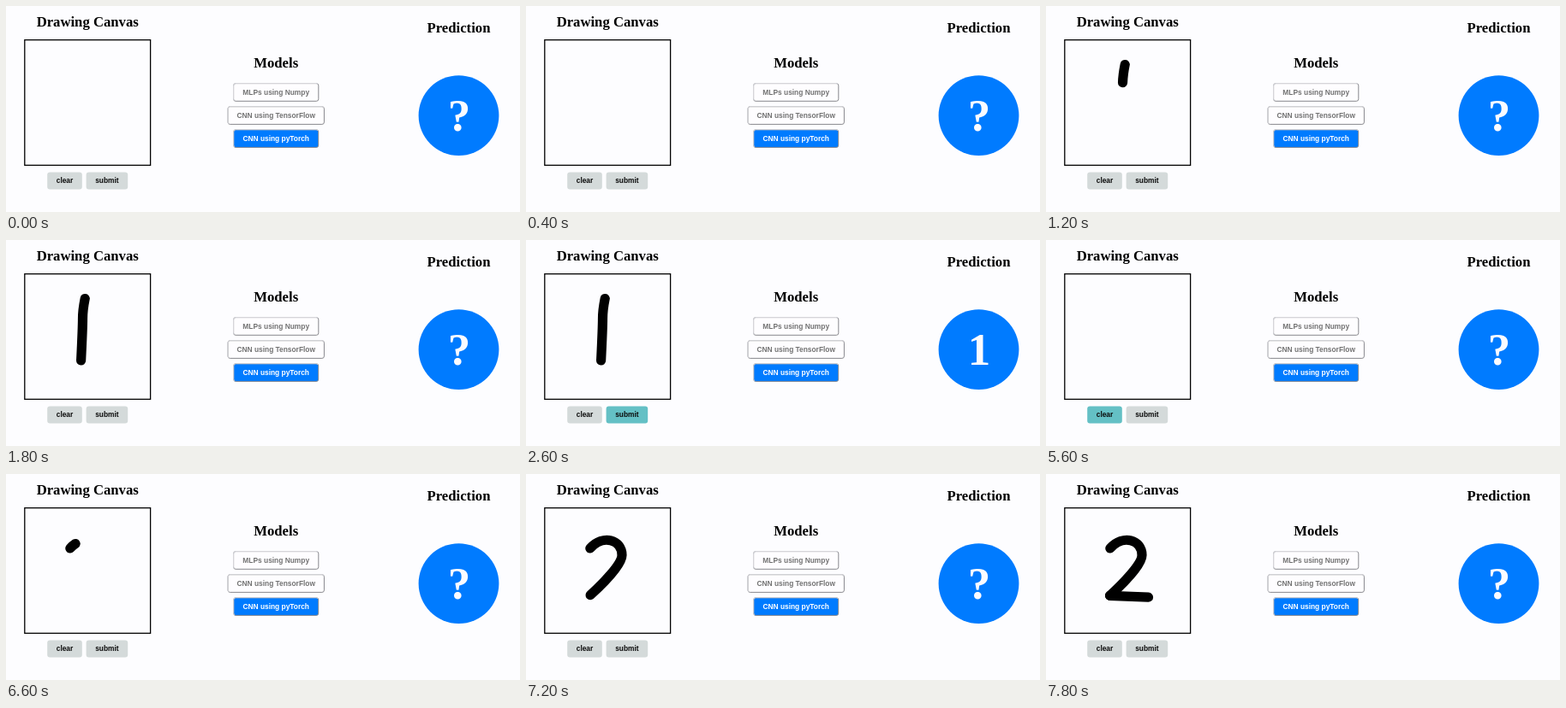
Write an HTML page with a canvas that moves like this. It is 600 px wide and 241 px high and loops after 8000 ms.

```html
<!DOCTYPE html>
<html lang="en">
<head>
<meta charset="utf-8">
<title>Digit prediction</title>
<style>
  html, body { margin: 0; width: 100%; height: 100%; overflow: hidden; background: #fdfdff; }
  canvas { display: block; width: 600px; height: 241px; }
</style>
</head>
<body>
<canvas id="stage"></canvas>
<script>
const LOOP = 8000, STEP = 200;
const SUBMITTED = 2600, CLEARED = 5600;
const BLUE = '#007bff';
const IDLE = [212, 218, 218], HOVER = [100, 192, 197];
const SERIF = '"Liberation Serif", "Times New Roman", serif';
const SANS = '"Liberation Sans", Arial, sans-serif';

const canvas = document.getElementById('stage');
const ratio = window.devicePixelRatio || 1;
canvas.width = Math.round(600 * ratio);
canvas.height = Math.round(241 * ratio);
const ctx = canvas.getContext('2d');
ctx.scale(ratio, ratio);

const clamp = v => Math.min(1, Math.max(0, v));
const smooth = p => p * p * (3 - 2 * p);
const speedUp = p => p ** 1.5;
const slowDown = p => Math.sin(p * Math.PI / 2);

function penStroke(d, start, duration, ease) {
  const shape = document.createElementNS('http://www.w3.org/2000/svg', 'path');
  shape.setAttribute('d', d);
  return { path: new Path2D(d), length: shape.getTotalLength(), start, duration, ease };
}

const ONE = [penStroke('M92.2 68.5 Q89.5 82 89.5 92 T87.6 141', 950, 700, smooth)];
const TWO = [
  penStroke('M74.8 87 C90 70 112 77 112 95 C112 106 88 130 74.5 142.3', 6470, 735, speedUp),
  penStroke('M74.5 142.3 L119.5 144.2', 7400, 400, slowDown)
];

function drawStroke({ path, length, start, duration, ease }, t) {
  const shown = length * ease(clamp((t - start) / duration));
  if (!shown) return;
  ctx.save();
  ctx.lineWidth = 11.2;
  ctx.lineCap = ctx.lineJoin = 'round';
  ctx.strokeStyle = '#000';
  ctx.setLineDash([shown, length * 2]);
  ctx.stroke(path);
  ctx.restore();
}

function label(text, x, baseline, size, family, color) {
  ctx.font = `bold ${size}px ${family}`;
  ctx.textAlign = 'center';
  ctx.fillStyle = color;
  ctx.fillText(text, x, baseline);
}

function roundBox(x, y, w, h, r) {
  ctx.beginPath();
  ctx.roundRect(x, y, w, h, r);
}

// The hover colour fades in after `enter` and is gone again at `leave`.
function actionButton(text, x, w, t, enter, leave) {
  const amount = clamp(Math.min(t - enter, leave - t) / 400);
  const mixed = IDLE.map((v, i) => v + (HOVER[i] - v) * amount);
  roundBox(x, 194.5, w, 20, 3);
  ctx.fillStyle = `rgb(${mixed.join()})`;
  ctx.fill();
  label(text, x + w / 2, 207.2, 8.4, SANS, '#0b0b0b');
}

function modelButton(text, y, w, fill, color) {
  const x = 315.2 - w / 2, h = 20.7;
  roundBox(x, y, w, h, 2.5);
  ctx.fillStyle = fill;
  ctx.fill();
  ctx.lineWidth = 1;
  ctx.strokeStyle = '#88888d';
  ctx.stroke();
  // Lighter top and left edges make the button look raised.
  ctx.save();
  ctx.beginPath();
  ctx.moveTo(x - 1, y + h + 1);
  ctx.lineTo(x - 1, y - 1);
  ctx.lineTo(x + w + 1, y - 1);
  ctx.lineTo(x + w - h / 2, y + h / 2);
  ctx.lineTo(x + h / 2, y + h / 2);
  ctx.clip();
  roundBox(x, y, w, h, 2.5);
  ctx.strokeStyle = '#dcdce0';
  ctx.stroke();
  ctx.restore();
  label(text, 315.2, y + 13.3, 8.4, SANS, color);
}

function draw(t) {
  ctx.fillStyle = '#fdfdff';
  ctx.fillRect(0, 0, 600, 241);

  label('Drawing Canvas', 95.2, 23.6, 16.7, SERIF, '#000');
  label('Models', 315.2, 72, 16.7, SERIF, '#000');
  label('Prediction', 528.5, 31, 16.7, SERIF, '#000');

  ctx.lineWidth = 1.3;
  ctx.strokeStyle = '#000';
  ctx.strokeRect(21.8, 39.7, 146.8, 146.6);
  for (const stroke of t < CLEARED ? ONE : TWO) drawStroke(stroke, t);

  actionButton('clear', 48.2, 40.6, t, CLEARED - 400, CLEARED + 400);
  actionButton('submit', 93.6, 48.6, t, 2000, 5400);

  modelButton('MLPs using Numpy', 90.6, 99.2, '#fefdff', '#727272');
  modelButton('CNN using TensorFlow', 117.7, 112.4, '#fefdff', '#727272');
  modelButton('CNN using pyTorch', 144.7, 99, BLUE, '#fff');

  ctx.beginPath();
  ctx.arc(528.5, 128.1, 46.9, 0, Math.PI * 2);
  ctx.fillStyle = BLUE;
  ctx.fill();
  const answer = t >= SUBMITTED && t < CLEARED ? '1' : '?';
  label(answer, 528.9, 146.4, 53, SERIF, '#fbfbff');
}

const begin = performance.now();
function tick() {
  const t = (performance.now() - begin) % LOOP;
  draw(Math.floor(t / STEP) * STEP);
  requestAnimationFrame(tick);
}
tick();
</script>
</body>
</html>
```
